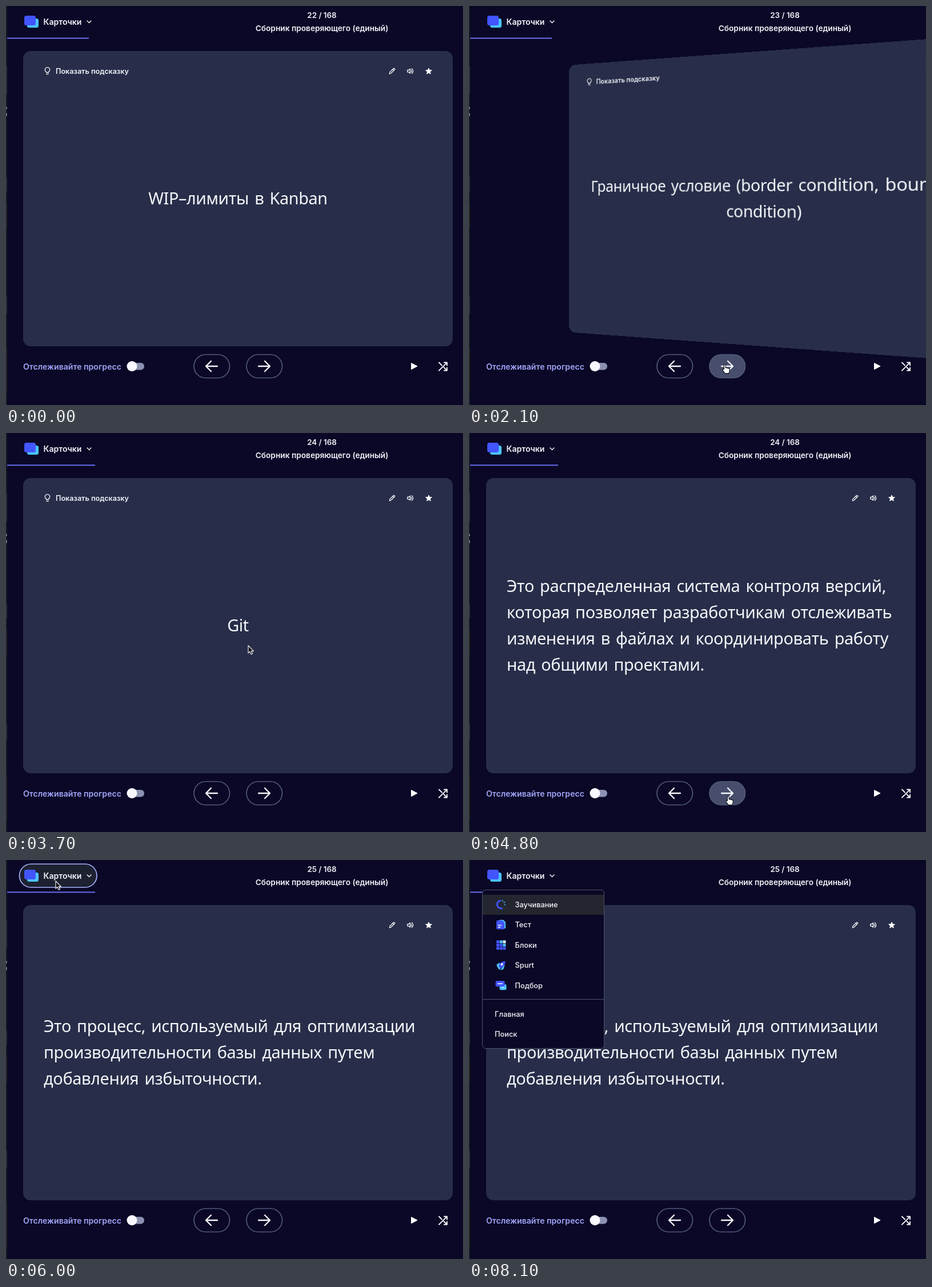
An HTML page that plays this animation: 800x700 px, repeating every 8200 ms.

```html
<!DOCTYPE html>
<html lang="ru">
<head>
<meta charset="utf-8">
<title>Карточки</title>
<style>
  html, body { margin: 0; width: 100%; height: 100%; overflow: hidden; background: #0a0826; }
  #stage { position: relative; width: 800px; height: 700px; overflow: hidden; background: #0a0826; }
  svg { position: absolute; left: 0; top: 0; display: block; }
  #card { position: absolute; left: 30px; top: 79px; width: 752px; height: 518px; border-radius: 13px; background: #282e49; }
  text { font-family: Inter, sans-serif; font-weight: 600; font-size: 13px; fill: #f2f3fa; }
  .mid { text-anchor: middle; }
  #words text { font: 400 28.8px "Noto Sans", sans-serif; letter-spacing: -.37px; word-spacing: 3px; fill: #f6f7fb; }
  .line { fill: none; stroke: #f6f7fb; stroke-linecap: round; stroke-linejoin: round; }
  .pill { fill: none; stroke: #515a7b; stroke-width: 1.7; }
  .item { font-size: 12.8px; font-weight: 500; }
  .blue { fill: #4255ff; }
  .cyan { fill: #4cc3ff; }
</style>
</head>
<body>
<div id="stage">
  <svg width="800" height="700">
    <rect width="2" height="700" fill="#171a22"/>
    <path d="M0 105h2v50h-2zM0 300h2v25h-2zM0 510h2v30h-2z" fill="#272e38"/>
    <path d="M0 345h2v45h-2zM0 600h2v80h-2z" fill="#24241f"/>
    <path d="M0 177h1.5v4h-1.5zM0 188h1.5v5h-1.5z" fill="#8d9097"/>

    <rect id="tab" class="pill" x="23.5" y="7" width="135.5" height="41" rx="20.5" style="fill:#1d2130;stroke:#a8b1ff"/>
    <rect x="37" y="22" width="20" height="16" rx="3.5" class="cyan"/>
    <rect x="32" y="17" width="20" height="17" rx="3.5" class="blue"/>
    <text x="65.5" y="33" style="font-size:14.1px">Карточки</text>
    <path d="M142 26l3.5 3.5 3.5-3.5" class="line" stroke-width="1.4"/>
    <rect id="bar" x="2" y="55.5" height="2" fill="#6670f2"/>
    <text id="count" class="mid" x="553" y="21" style="font-size:13.4px"></text>
    <text class="mid" x="553" y="44" style="font-size:13.7px">Сборник проверяющего (единый)</text>

    <text x="30" y="637.5" style="font-size:14.1px;fill:#a2a5fa">Отслеживайте прогресс</text>
    <rect x="216" y="626" width="26" height="12.5" rx="6.2" fill="#8b91b1"/>
    <circle cx="220.5" cy="632" r="9" fill="#f8f8fe"/>
    <rect class="pill" x="329" y="611.5" width="62.5" height="41" rx="20.5"/>
    <rect id="next" class="pill" x="421" y="611.5" width="62.5" height="41" rx="20.5"/>
    <path d="M370 632h-20M359 623l-9 9 9 9M442 632h20M453 623l9 9-9 9" class="line" stroke-width="2.3"/>
    <path d="M709.5 626.5v11l10.5-5.5z" fill="#fff" stroke="#fff" stroke-linejoin="round"/>
    <path d="M758 625.5l5 5M766.5 634l5.5 5.5M758 639.5l14-14M767 625.5h5v5M767 639.5h5v-5" class="line" stroke-width="1.9"/>
  </svg>

  <div id="card">
    <svg width="752" height="518" viewBox="30 79 752 518">
      <g id="hint">
        <path d="M70.7 117v-1.4a4.2 4.2 0 1 1 3.6 0v1.4zM70.8 119.7h3.4" class="line" stroke-width="1.3"/>
        <text x="87" y="119" style="font-size:12.6px">Показать подсказку</text>
      </g>
      <path d="M671.3 119l.7-3 6.2-6.2a1.4 1.4 0 0 1 2 2l-6.2 6.2zM677 111l2 2" class="line" stroke-width="1.3"/>
      <path d="M702.8 112.5h2l2.6-2.2v7.8l-2.6-2.2h-2zM709.3 112.4a2.6 2.6 0 0 1 0 3.6M710.2 109.9a5 5 0 0 1 0 8.6" class="line" stroke-width="1.3"/>
      <path id="star" fill="#fff" stroke="#fff" stroke-linejoin="round"/>
      <g id="words"></g>
    </svg>
  </div>

  <svg width="800" height="700">
    <g id="menu">
      <rect x="23.5" y="52.5" width="213" height="278" rx="5.5" fill="#0a0826" stroke="#4c5269"/>
      <rect x="24" y="61" width="212" height="35" fill="#23262f"/>
      <path d="M24 244.5h212" stroke="#4c5269"/>
      <circle cx="56" cy="78" r="6.8" fill="none" stroke="#4255ff" stroke-width="2.8" stroke-dasharray="24 30" transform="rotate(65 56 78)"/>
      <circle cx="56" cy="78" r="6.8" fill="none" stroke="#4cc3ff" stroke-width="2" stroke-dasharray="1.8 2.4 1.8 2.4 1.8 50" transform="rotate(-75 56 78)"/>
      <path d="M53 105h7l4 4v11h-11z" class="cyan"/>
      <path d="M50 106h8l4 4v11.5h-12a2 2 0 0 1-2-2v-11.5a2 2 0 0 1 2-2z" class="blue"/>
      <path d="M51 114.5h6M51 118h4" stroke="#fff" stroke-width="1.4"/>
      <g id="grid"></g>
      <path d="M48 184l5-4 3 8-2 5-3-3zM59 187l4-3-3 8-5 1z" class="cyan"/>
      <path d="M52 187c1-6 5-9 11.5-9.5 0 6-3 10-9 12z" class="blue"/>
      <circle cx="57.5" cy="183" r="2" fill="#fff"/>
      <rect x="53.5" y="218" width="12" height="10" rx="2.5" class="cyan"/>
      <rect x="46.5" y="212" width="16" height="10" rx="2.5" class="blue"/>
      <path d="M50 217h9" stroke="#fff" stroke-width="1.5"/>
      <path d="M57.5 223.5h4" stroke="#fff"/>
      <g id="items"></g>
    </g>
    <g id="cursor">
      <path id="arrow" d="M0 0v13.2l3-2.8 2.1 4.8 2.3-1-2.1-4.6h4.2z" fill="#080810" stroke="#fff" stroke-width="1.1" stroke-linejoin="round"/>
      <path id="hand" transform="scale(1.08)" d="M-1.5 7.5V1a1.3 1.3 0 0 1 2.6 0v4l5 1.2q1.9.5 1.7 2.4l-.6 3.4-1 2.5h-6l-4-5.3q-.6-1.6 1-1.4z" fill="#fff" stroke="#11121b" stroke-width="1.1" stroke-linejoin="round"/>
    </g>
  </svg>
</div>

<script>
const LOOP = 8200, STEP = 100;
const FLIP = 350, SLIDE = 400;
const $ = id => document.getElementById(id);

// Each card: arrival time, flip time, width of the bar, both sides
const cards = [
  { n: 22, at: -SLIDE, flip: 1050, bar: 143, front: ["WIP–лимиты в Kanban"],
    back: ["Ограничения на количество задач,", "которые могут одновременно находиться", "в работе на каждом этапе."] },
  { n: 23, at: 1900, flip: 2500, bar: 143, front: ["Граничное условие (border condition, boundary", "condition)"],
    back: ["Значение, находящееся на границе классов", "эквивалентности"] },
  { n: 24, at: 3200, flip: 4000, bar: 154, front: ["Git"],
    back: ["Это распределенная система контроля версий,", "которая позволяет разработчикам отслеживать", "изменения в файлах и координировать работу", "над общими проектами."] },
  { n: 25, at: 4900, flip: 5450, bar: 154, front: ["Денормализация"],
    back: ["Это процесс, используемый для оптимизации", "производительности базы данных путем", "добавления избыточности."] }
];

// Pointer stops: time, x, y
const path = [
  [300, 560, -16], [900, 430, 400], [1250, 430, 400], [1700, 448, 629], [2150, 448, 629],
  [2400, 430, 410], [2700, 430, 420], [3000, 459, 585], [3100, 455, 634], [3300, 455, 634],
  [3700, 424, 373], [4200, 424, 373], [4600, 454, 637], [5050, 454, 637], [5350, 420, 400],
  [5600, 420, 400], [5950, 87, 37], [7500, 87, 37], [7900, 100, -18]
];
const MENU_AT = 6400;

const clamp = v => Math.max(0, Math.min(1, v));
const ease = v => v * v * (3 - 2 * v);
const show = (id, on) => { $(id).style.display = on ? "" : "none"; };

function pointer(t) {
  let i = 0;
  while (i < path.length - 2 && t >= path[i + 1][0]) i++;
  const [a, b] = [path[i], path[i + 1]];
  const k = ease(clamp((t - a[0]) / (b[0] - a[0])));
  return [a[1] + (b[1] - a[1]) * k, a[2] + (b[2] - a[2]) * k];
}

let shown;
function setWords(lines) {
  if (lines === shown) return;
  shown = lines;
  const left = lines.length > 2;
  const first = 348 - 23 * (lines.length - 1);
  $("words").innerHTML = lines.map((s, i) =>
    `<text x="${left ? 66 : 406}" y="${first + 46 * i}" class="${left ? "" : "mid"}">${s}</text>`).join("");
}

function draw(t) {
  const card = cards.filter(c => t >= c.at).pop();
  $("count").textContent = card.n + " / 168";
  $("bar").setAttribute("width", card.bar);

  const away = 2 * (1 - ease(clamp((t - card.at) / SLIDE)));
  const turn = 180 * ease(clamp((t - card.flip) / FLIP));
  const isBack = turn > 90;
  setWords(isBack ? card.back : card.front);
  show("hint", !isBack);
  $("card").style.transform = away || turn % 180
    ? `perspective(900px) translateX(${109 * away}px) rotateY(${-14.6 * away}deg) rotateX(${isBack ? turn - 180 : turn}deg)`
    : "none";

  const [x, y] = pointer(t);
  const onNext = x > 421 && x < 484 && y > 611 && y < 653;
  const onTab = x > 24 && x < 159 && y > 7 && y < 49;
  $("next").style.fill = onNext ? "#474e6c" : "none";
  show("tab", onTab && t < MENU_AT);
  show("menu", t >= MENU_AT);
  show("arrow", !onNext);
  show("hand", onNext);
  $("cursor").setAttribute("transform", `translate(${x} ${y})`);
}

$("star").setAttribute("d", "M" + Array.from({ length: 10 }, (_, i) => {
  const r = i % 2 ? 2.5 : 5.6, a = Math.PI * (i / 5 - .5);
  return (740 + r * Math.cos(a)).toFixed(2) + " " + (114.6 + r * Math.sin(a)).toFixed(2);
}).join("L") + "z");

$("grid").innerHTML = Array.from({ length: 9 }, (_, i) => {
  const tint = i === 2 ? "#d5ecff" : i === 1 || i === 5 ? "#4cc3ff" : "#4255ff";
  return `<rect x="${48 + i % 3 * 5.7}" y="${141 + Math.floor(i / 3) * 5.7}" width="5" height="5" fill="${tint}"/>`;
}).join("");

const label = (s, x, y) => `<text class="item" x="${x}" y="${y}">${s}</text>`;
$("items").innerHTML =
  ["Заучивание", "Тест", "Блоки", "Spurt", "Подбор"].map((s, i) => label(s, 80.5, 83 + 35.4 * i)).join("") +
  ["Главная", "Поиск"].map((s, i) => label(s, 45, 275 + 35.4 * i)).join("");

const start = performance.now();
function frame() {
  const t = (performance.now() - start) % LOOP;
  draw(Math.floor(t / STEP) * STEP);
  requestAnimationFrame(frame);
}
frame();
</script>
</body>
</html>
```
